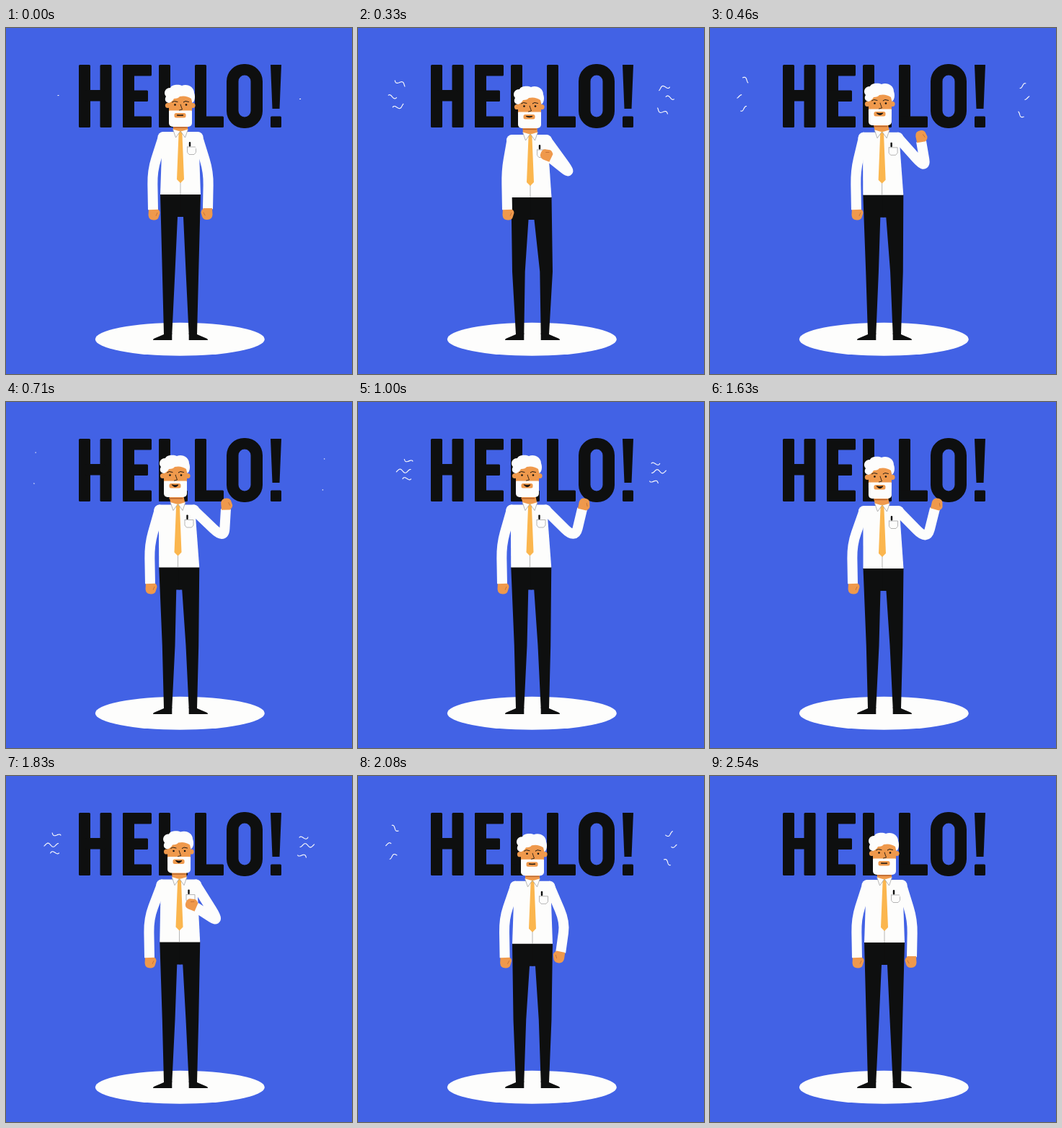
An HTML page with a canvas that plays this animation: 480x480 px, repeating every 2.68 s.

```html
<!DOCTYPE html>
<html lang="en">
<head>
<meta charset="utf-8">
<title>Hello!</title>
<style>
html, body { margin: 0; width: 100%; height: 100%; overflow: hidden; background: #4262e5; }
canvas { display: block; width: 480px; height: 480px; }
</style>
</head>
<body>
<canvas id="stage" width="480" height="480" role="img" aria-label="HELLO!"></canvas>
<script>
const ctx = document.getElementById('stage').getContext('2d');
const LOOP = 2680, TICK = 1000 / 24;
const BLUE = '#4262e5', INK = '#0e0f0f', WHITE = '#fdfdfc', SKIN = '#ef994c',
      SHADE = '#b9662f', TIE = '#fbb64e', GREY = '#a3a3a3';

const REST = { chest: 0, dip: 0, headX: 0, headY: 0, smile: 0,
  ex: 281, ey: 200, wx: 280, wy: 251, leftX: 204, angle: -180 };
const LIFT = { chest: -3, dip: 4, headX: -4, headY: 2, smile: .4,
  ex: 297, ey: 204, wx: 267, wy: 180, leftX: 207, angle: -65 };
const WAVE_IN = { chest: -3.5, dip: -1.5, headX: -7, headY: -5, smile: 1,
  ex: 303, ey: 190, wx: 301, wy: 149, leftX: 200, angle: -12 };
const WAVE_OUT = { ...WAVE_IN, ex: 301, wx: 312, wy: 148, angle: 16 };
const LEAVE = { ...WAVE_OUT, chest: -3, dip: 0, headX: -6, headY: -3, ey: 192, leftX: 198 };
const LOWER = { ...LIFT, chest: -1.5, dip: -.4, headX: -2, headY: -2.5, smile: 1,
  wx: 263, wy: 181, leftX: 199 };
const SINK = { ...REST, dip: 3, headY: 2, smile: .4,
  ex: 293, ey: 204, wx: 282, wy: 234, leftX: 203, angle: -150 };

const KEYS = [
  [0, REST], [333, LIFT], [560, WAVE_OUT], [810, WAVE_IN], [1040, WAVE_OUT],
  [1270, WAVE_IN], [1540, WAVE_OUT], [1630, LEAVE], [1830, LOWER], [1980, SINK],
  [2220, REST], [LOOP, REST]
];

const lerp = (a, b, k) => a + (b - a) * k;
const clamp = v => Math.min(1, Math.max(0, v));
const easeOut = v => 1 - (1 - clamp(v)) ** 2;

// Monotone cubic interpolation of one pose property
function valueAt(name, i, t) {
  const slope = k => KEYS[k] && KEYS[k + 1]
    ? (KEYS[k + 1][1][name] - KEYS[k][1][name]) / (KEYS[k + 1][0] - KEYS[k][0]) : 0;
  const tangent = k => {
    const a = slope(k - 1), b = slope(k);
    return a * b <= 0 ? 0 : 2 * a * b / (a + b);
  };
  const [from, p] = KEYS[i], [to, q] = KEYS[i + 1];
  const span = to - from, u = (t - from) / span;
  return lerp(p[name], q[name], u * u * (3 - 2 * u)) +
    span * (u * (1 - u) ** 2 * tangent(i) - u * u * (1 - u) * tangent(i + 1));
}

function poseAt(t) {
  const i = KEYS.findIndex((key, k) => t < KEYS[k + 1][0]);
  return Object.fromEntries(Object.keys(REST).map(name => [name, valueAt(name, i, t)]));
}

function poly(color, ...pts) {
  ctx.beginPath();
  pts.forEach(([x, y]) => ctx.lineTo(x, y));
  ctx.closePath();
  ctx.fillStyle = color;
  ctx.fill();
}

function box(color, x, y, w, h, r = 0) {
  ctx.beginPath();
  ctx.roundRect(x, y, w, h, r);
  ctx.fillStyle = color;
  ctx.fill();
}

function dot(color, x, y, r) {
  ctx.beginPath();
  ctx.arc(x, y, r, 0, 7);
  ctx.fillStyle = color;
  ctx.fill();
}

function line(color, width, ...pts) {
  ctx.beginPath();
  pts.forEach(([x, y]) => ctx.lineTo(x, y));
  ctx.strokeStyle = color;
  ctx.lineWidth = width;
  ctx.stroke();
}

function shape(color, path) {
  ctx.fillStyle = color;
  ctx.fill(new Path2D(path));
}

function shifted(x, y, draw) {
  ctx.save();
  ctx.translate(x, y);
  draw();
  ctx.restore();
}

function lettering() {
  const stem = x => box(INK, x, 51, 16, 87, 1.5);
  const bar = (x, y, w) => box(INK, x, y, w, 15.5, 1.5);
  [101, 130.5, 162, 212, 262].forEach(stem);
  bar(110, 86, 28);
  bar(162, 51, 40);
  bar(162, 86.5, 35);
  [162, 212, 262].forEach(x => bar(x, 122.5, 40));
  ctx.beginPath();
  ctx.roundRect(306, 50, 50, 89, 24);
  ctx.roundRect(322.5, 65.5, 17, 58, 8.5);
  ctx.fill('evenodd');
  poly(INK, [367, 51], [382, 51], [379.5, 112], [369.5, 112]);
  bar(367, 122.5, 15);
}

// A wavy stroke that grows from its inner end, then shrinks towards the outer one
function squiggle(x0, y0, x1, y1, crest, age) {
  const head = easeOut(age / 550), tail = easeOut((age - 180) / 500);
  if (age <= 0 || tail >= 1) return;
  const length = Math.hypot(x1 - x0, y1 - y0);
  const nx = (y1 - y0) / length, ny = -(x1 - x0) / length;
  const pts = Array.from({ length: 25 }, (_, i) => {
    const k = lerp(tail, head, i / 24);
    const off = 2.5 * Math.cos(2 * Math.PI * (k * length - crest) / 14.5);
    return [lerp(x0, x1, k) + nx * off, lerp(y0, y1, k) + ny * off];
  });
  line(WHITE, 1.15, ...pts);
}

function bursts(t) {
  for (const start of [-8, 820, 1650]) {
    const age = t - start;
    for (const turn of [0, Math.PI]) {
      ctx.save();
      ctx.translate(240.3, 96);
      ctx.rotate(turn);
      ctx.translate(-240.3, -96);
      squiggle(73, 96, 37, 95, 22, age);
      squiggle(75, 84, 42, 68, 23, age - 85);
      squiggle(73, 105, 39, 114, 16, age - 85);
      ctx.restore();
    }
  }
}

function legs(p) {
  const y = p.dip, bend = Math.max(0, y) * .7;
  for (const side of [-1, 1]) {
    const x = p.chest * .5 * side;
    ctx.save();
    ctx.translate(242, 0);
    ctx.scale(side, 1);
    poly(INK, [x - .5, 230 + y], [28 + x, 230 + y], [25.2 + bend, 338], [23, 425],
      [11.7, 425], [7.5 + bend, 338], [4 + x, 262 + y], [x - .5, 262 + y]);
    shape(INK, 'M11.7 423.5H23V425Q30 428 37 431Q39 433 37 433H11.7Z');
    ctx.restore();
  }
}

function sleeve(sx, sy, ex, ey, wx, wy) {
  const near = .35;
  dot(WHITE, sx, sy, 7.5);
  ctx.beginPath();
  ctx.moveTo(sx, sy);
  ctx.lineTo(lerp(ex, sx, near), lerp(ey, sy, near));
  ctx.quadraticCurveTo(ex, ey, lerp(ex, wx, near), lerp(ey, wy, near));
  ctx.lineTo(wx, wy);
  ctx.strokeStyle = WHITE;
  ctx.lineWidth = 14;
  ctx.lineCap = 'butt';
  ctx.stroke();
  ctx.lineCap = 'round';
}

function hand(x, y, angle, flip) {
  ctx.save();
  ctx.translate(x, y);
  ctx.scale(flip, 1);
  ctx.rotate(angle * Math.PI / 180);
  shape(SKIN, 'M-6 1L-6.5-8Q-6-15 1-15Q7-15 8-10L9.5-5Q9.5-2 6 1Z');
  line(SHADE, .7, [4, -9], [6, -5]);
  ctx.restore();
}

function torso(p) {
  const c = p.chest, w = c * .5, y = p.dip;
  const neckX = p.headX - c, neckY = p.headY - y;
  poly(WHITE, [217 + c * 1.5, 144 + y], [267 + c * 1.5, 144 + y],
    [270 + w, 231 + y], [214 + w, 231 + y]);
  shifted(c, y, () => {
    poly(SKIN, [232 + neckX, 130 + neckY], [252 + neckX, 130 + neckY],
      [252, 142], [248, 145], [236, 145], [232, 142]);
    shifted(neckX * .8, neckY * .8, () => line(SHADE, 1.5, [233, 138], [251, 138]));
    line(GREY, .8, [242, 214], [242, 230.5]);
    poly(TIE, [238.5, 142.5], [245.5, 142.5], [244.5, 148], [247, 210], [242, 215],
      [237, 210], [239.5, 148]);
    for (const side of [-1, 1]) {
      const flap = [[10.5, 140.5], [6.5, 152], [.5, 143.5]].map(([x, h]) => [242 + side * x, h]);
      poly(WHITE, ...flap);
      line(GREY, .8, ...flap);
    }
    line(GREY, .8, [251.5, 165], [263.5, 165], [263.5, 172.5], [261, 175.5],
      [254, 175.5], [251.5, 172.5], [251.5, 165]);
    box(INK, 253.8, 158, 2.4, 6.5, 1);
  });
}

function face(smile) {
  [224.5, 259].forEach(x => dot(SKIN, x, 107.5, 3.6));
  box(SKIN, 226, 90, 32, 32);
  box(WHITE, 226, 114.5, 32, 22.5, [1, 1, 5, 5]);
  box(SKIN, 233.5, 118, 16, 6.5, 2.5);
  ctx.beginPath();
  ctx.moveTo(237.5, 121 - smile);
  ctx.quadraticCurveTo(241.5, 121, 246, 121 - smile);
  ctx.quadraticCurveTo(241.5, 121.5 + 4 * smile, 237.5, 121 - smile);
  ctx.fillStyle = ctx.strokeStyle = INK;
  ctx.lineWidth = .9;
  ctx.fill();
  ctx.stroke();
  for (const x of [234.5, 250]) {
    dot(INK, x, 106.5, 1.3);
    line(INK, .9, [x - 4, 103], [x - 1, 101.5], [x + 3.5, 102.5]);
  }
  line(INK, .8, [242, 106], [244.5, 113], [240.5, 114]);
  shape(WHITE, 'M226 104C220 103 220 98 222 95C218 91 220 83 228 83C230 78 240 78 244 80' +
    'C252 77 261 82 261 90C263 95 262 102 258.5 104L257 98Q250 93 241 95' +
    'Q239 98 233 98Q231 102 226 104Z');
}

function draw(t) {
  const p = poseAt(t);
  ctx.lineCap = ctx.lineJoin = 'round';
  ctx.fillStyle = BLUE;
  ctx.fillRect(0, 0, 480, 480);
  lettering();
  bursts(t);
  ctx.beginPath();
  ctx.ellipse(241.3, 431.8, 117.5, 23, 0, 0, 7);
  ctx.fillStyle = WHITE;
  ctx.fill();
  legs(p);
  const lean = p.chest * 1.5, shoulderY = 151.5 + p.dip;
  hand(p.leftX, 251.5, -180, -1);
  sleeve(218 + lean, shoulderY, p.leftX - 1, 198, p.leftX, 252);
  torso(p);
  shifted(p.headX, p.headY, () => face(p.smile));
  sleeve(266 + lean, shoulderY, p.ex, p.ey, p.wx, p.wy);
  hand(p.wx, p.wy, p.angle, 1);
}

const begin = performance.now();
function play() {
  const t = (performance.now() - begin) % LOOP;
  draw(Math.floor((t + 5) / TICK) * TICK % LOOP);
  requestAnimationFrame(play);
}
play();
</script>
</body>
</html>
```
